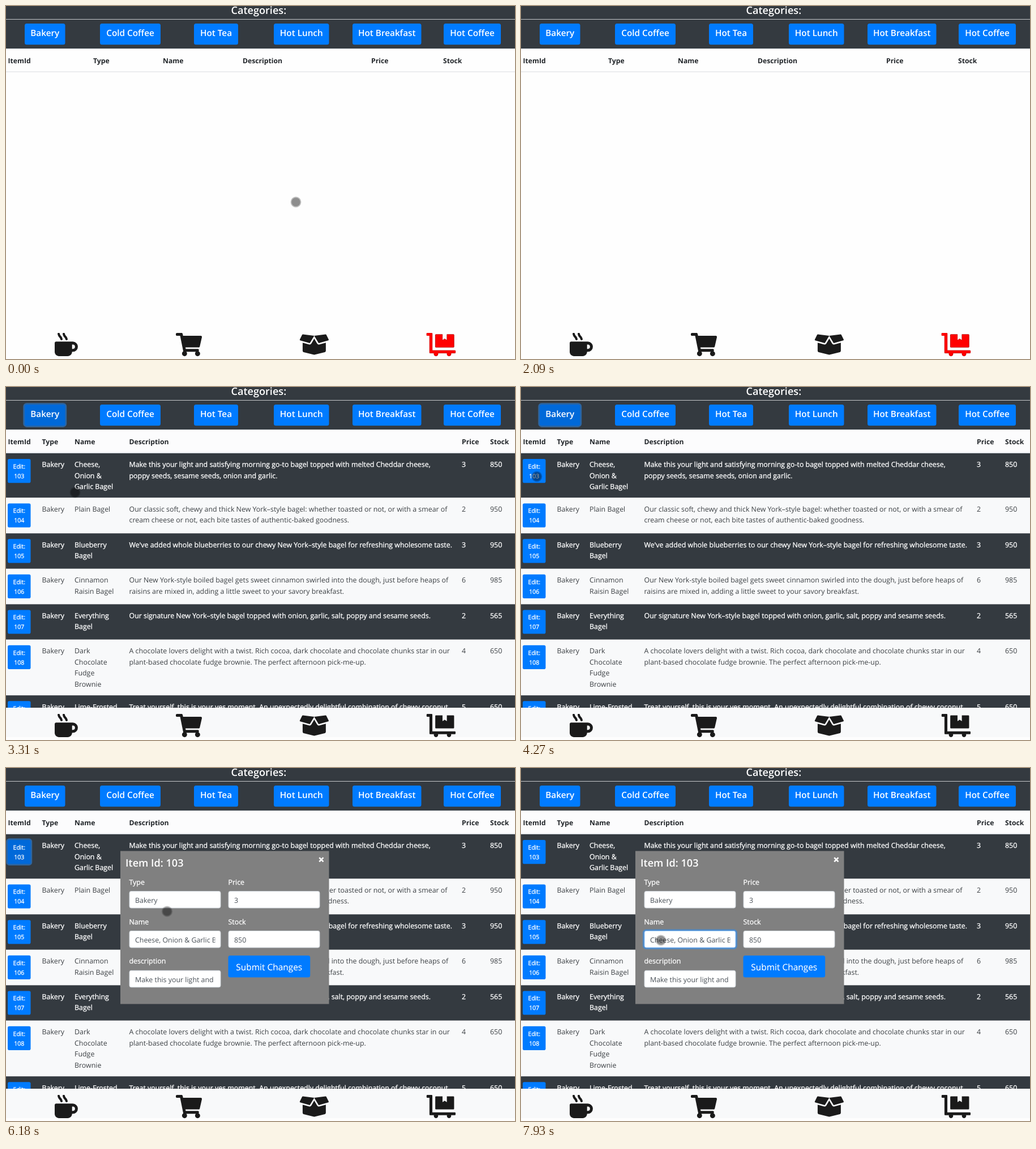
Recreate the animation shown at these times as an HTML page. Size 899 px wide and 623 px high, loop 8000 ms.

```html
<!DOCTYPE html>
<html lang="en">
<head>
<meta charset="utf-8">
<title>Inventory</title>
<style>
html, body { margin: 0; width: 100%; height: 100%; overflow: hidden; background: #fefefe; }
svg { display: block; width: 899px; height: 623px; }
text { font: 12.4px "Open Sans", "Noto Sans", sans-serif; text-rendering: geometricPrecision; fill: #3c4044; white-space: pre; }
.th { font-size: 12.2px; font-weight: 700; fill: #212529; }
.on { fill: #fff; stroke: #fff; stroke-width: .3px; }
.title, .cat { font-weight: 600; fill: #fff; }
.title { font-size: 18.1px; }
.cat { font-size: 15.3px; }
.edit { font-size: 10.6px; }
.submit { font-size: 15.45px; stroke-width: .15px; }
.field { fill: #495057; }
.mid { text-anchor: middle; }
.btn { fill: #007bff; }
.ring { fill: none; stroke: rgba(38,143,255,.5); stroke-width: 0; }

.before, .after, .modal, .bar, .cursor, .pressed, .ring, .focus { animation: 8s step-end infinite; }
.before { animation-name: before; }
.after { animation-name: after; }
.modal { animation-name: modal; }
.bar { animation-name: bar; }
.cursor { animation-name: cursor; }
.cat-on { animation-name: catOn; }
.cat-ring { animation-name: catRing; }
.edit-on { animation-name: editOn; }
.edit-ring { animation-name: editRing; }
.name-ring { animation-name: nameRing; }
.focus { animation-name: focus; }

@keyframes before { 0% { opacity: 1 } 27.625%, 100% { opacity: 0 } }
@keyframes after { 0% { opacity: 0 } 27.625%, 100% { opacity: 1 } }
@keyframes modal { 0% { opacity: 0 } 58%, 100% { opacity: 1 } }
@keyframes bar { 0% { opacity: 0 } 27.625% { opacity: 1 } 32.375% { opacity: .5 } 33.875%, 100% { opacity: 0 } }
@keyframes catOn { 0% { fill: #007bff } 27.625% { fill: #0069d9 } 59.5%, 100% { fill: #007bff } }
@keyframes catRing {
  0% { stroke-width: 0 } 27.625% { stroke-width: 3px } 29.125% { stroke-width: 5.4px }
  58% { stroke-width: 3px } 59.5%, 100% { stroke-width: 0 }
}
@keyframes editOn { 0% { fill: #007bff } 58% { fill: #0069d9 } 89.625%, 100% { fill: #007bff } }
@keyframes editRing {
  0% { stroke-width: 0 } 59.5% { stroke-width: 5.4px } 89.625% { stroke-width: 2.6px } 91.5%, 100% { stroke-width: 0 }
}
@keyframes nameRing { 0% { stroke-width: 0 } 89.625% { stroke-width: 2.6px } 91.5%, 100% { stroke-width: 5.2px } }
@keyframes focus { 0% { stroke: #ced4da } 89.625% { stroke: #a0c6f0 } 91.5%, 100% { stroke: #80bdff } }
@keyframes cursor {
  0% { opacity: 1; transform: translate(512px, 346px) }
  6.25% { opacity: 0 }
  7.75% { opacity: 1; transform: translate(482px, 314px) }
  9.25% { opacity: 0 }
  10.75% { opacity: 1; transform: translate(417.5px, 231.5px) }
  12.625% { opacity: 0 }
  16.125% { opacity: 1; transform: translate(217px, 100.5px) }
  18% { opacity: 0 }
  21.125% { opacity: 1; transform: translate(71px, 49.5px) }
  26.125% { opacity: 0 }
  27.625% { opacity: 1; transform: translate(69px, 48.5px) }
  36.875% { opacity: 0 }
  38.375% { opacity: 1; transform: translate(88px, 104px) }
  39.875% { opacity: 0 }
  41.375% { opacity: 1; transform: translate(122px, 186px) }
  42.875% { opacity: 0 }
  44.375% { opacity: 1; transform: translate(110px, 233px) }
  45.875% { opacity: 0 }
  47.375% { opacity: 1; transform: translate(69.5px, 202.5px) }
  48.875% { opacity: 0 }
  50.375% { opacity: 1; transform: translate(43px, 174px) }
  51.875% { opacity: 0 }
  53.375% { opacity: 1; transform: translate(28px, 158px) }
  64.375% { opacity: 0 }
  65.875% { opacity: 1; transform: translate(33px, 165px) }
  67.375% { opacity: 0 }
  68.875% { opacity: 1; transform: translate(48px, 188.5px) }
  70.75% { opacity: 0 }
  72.25% { opacity: 1; transform: translate(166px, 281px) }
  74.125% { opacity: 0 }
  77.25% { opacity: 1; transform: translate(284.5px, 253px) }
  78.75% { opacity: 0 }
  80.25% { opacity: 1; transform: translate(308px, 285px) }
  81.75% { opacity: 0 }
  83.25% { opacity: 1; transform: translate(315px, 311px) }
  84.75% { opacity: 0 }
  86.25% { opacity: 1; transform: translate(281px, 300px) }
  87.75% { opacity: 0 }
  89.625% { opacity: 1; transform: translate(267.5px, 306px) }
  94.625% { opacity: 0 }
  96.125% { opacity: 1; transform: translate(257px, 305px) }
  97.625% { opacity: 0 }
  99.125%, 100% { opacity: 1; transform: translate(247px, 304px) }
}
</style>
</head>
<body>
<svg id="stage" viewBox="0 0 899 623"></svg>
<script>
const LINE = 19.5;
const box = (x, y, w, h, attrs = '') => `<rect x="${x}" y="${y}" width="${w}" height="${h}" ${attrs}/>`;
const text = (x, y, str, cls = '') =>
  `<text x="${x}" y="${y}" class="${cls}">${str.replace(/&/g, '&amp;')}</text>`;
const lines = (x, y, str, cls) => str.split('|').map((s, i) => text(x, y + i * LINE, s, cls)).join('');
const icon = (x, d, attrs = '') => `<path transform="translate(${x} 577) scale(.08)" d="${d}" ${attrs}/>`;

const heads = ['ItemId', 'Type', 'Name', 'Description', 'Price', 'Stock'];
const wide = [3.5, 154, 277, 418, 645, 772];
const cols = [3.5, 63.5, 121, 217.5, 805, 855];

const cats = [
  ['Bakery', 33, 71.5], ['Cold Coffee', 166, 107], ['Hot Tea', 332, 78],
  ['Hot Lunch', 473, 97.5], ['Hot Breakfast', 612, 121.5], ['Hot Coffee', 773, 101]
];

// top, name, description, price, stock
const items = [
  [117, 'Cheese,|Onion &|Garlic Bagel', 'Make this your light and satisfying morning go-to bagel topped with melted Cheddar cheese,|poppy seeds, sesame seeds, onion and garlic.', 3, 850],
  [195.5, 'Plain Bagel', 'Our classic soft, chewy and thick New York–style bagel: whether toasted or not, or with a smear of|cream cheese or not, each bite tastes of authentic-baked goodness.', 2, 950],
  [258.3, 'Blueberry|Bagel', 'We\'ve added whole blueberries to our chewy New York–style bagel for refreshing wholesome taste.', 3, 950],
  [320.8, 'Cinnamon|Raisin Bagel', 'Our New York-style boiled bagel gets sweet cinnamon swirled into the dough, just before heaps of|raisins are mixed in, adding a little sweet to your savory breakfast.', 6, 985],
  [383.4, 'Everything|Bagel', 'Our signature New York–style bagel topped with onion, garlic, salt, poppy and sesame seeds.', 2, 565],
  [445.8, 'Dark|Chocolate|Fudge|Brownie', 'A chocolate lovers delight with a twist. Rich cocoa, dark chocolate and chocolate chunks star in our|plant-based chocolate fudge brownie. The perfect afternoon pick-me-up.', 4, 650],
  [544.2, 'Lime-Frosted', 'Treat yourself, this is your yes moment. An unexpectedly delightful combination of chewy coconut', 5, 650],
  [623]
];

const headRow = xs => heads.map((h, i) => text(xs[i], 101, h, 'th')).join('');

const category = ([name, x, w], i) =>
  (i ? '' : box(x, 31, w, 37.2, 'rx="3.5" class="ring cat-ring"')) +
  box(x, 31, w, 37.2, `rx="3.5" class="btn${i ? '' : ' pressed cat-on'}"`) +
  text(x + w / 2, 53, name, 'cat mid');

function row([top, name, desc, price, stock], i) {
  const dark = i % 2 === 0, cls = dark ? 'on' : '', y = top + 24.4;
  const edit = `${cols[0] - .5}" y="${top + 10}`;
  return box(0, top, 899, items[i + 1][0] - top, `fill="${dark ? '#343a40' : '#f8f9fa'}"`) +
    (i ? '' : box(edit, top + 10, 40.5, 42, '').replace(/<rect.*/, '') +
      box(3, top + 10, 40.5, 42.2, 'rx="2.8" class="ring edit-ring"')) +
    box(3, top + 10, 40.5, 42.2, `rx="2.8" class="btn${i ? '' : ' pressed edit-on'}"`) +
    text(23.3, top + 26.8, 'Edit:', 'on edit mid') +
    text(23.3, top + 43.8, String(103 + i), 'on edit mid') +
    ['Bakery', name, desc, String(price), String(stock)]
      .map((s, c) => lines(cols[c + 1], y, s, cls)).join('');
}

function field(x, y, label, value, focus) {
  return text(x, y, label, 'on') +
    (focus ? box(x, y + 11.5, 162, 30.5, 'rx="3.5" class="ring name-ring"') : '') +
    box(x + .5, y + 12, 161, 29.5, `rx="3" fill="#fff" stroke="#ced4da" ${focus ? 'class="focus"' : ''}`) +
    `<svg x="${x}" y="${y}" width="152" height="50">${text(10.5, 32.4, value, 'field')}</svg>`;
}

const modal = box(202, 146.5, 368.5, 270, 'fill="#808080"') +
  text(211, 174.4, 'Item Id: 103', 'title') +
  '<path d="M553.3 158.2l7.2 7.2m0-7.2l-7.2 7.2" stroke="#fff" stroke-width="2.6"/>' +
  field(217.5, 205.6, 'Type', 'Bakery') +
  field(392.5, 205.6, 'Price', '3') +
  field(217.5, 275.5, 'Name', 'Cheese, Onion & Garlic Bagel', true) +
  field(392.5, 275.5, 'Stock', '850') +
  field(217.5, 345.4, 'description', 'Make this your light and satisfying') +
  box(392.5, 331, 144.7, 38.5, 'rx="3.5" class="btn"') +
  text(464.8, 356.7, 'Submit Changes', 'on submit mid');

const steam = 'c2 8 8 14 16 14h16c10 0 18-8 16-18-4-28-16-54-36-75-15-15-24-33-27-53-1-8-8-14-16-14h-17c-10 0-17 8-16 18 4 32 18 61 41 84 12 12 20 28 23 44z';
const mug = `M127 146${steam}M239 146${steam}M400 192H32c-18 0-32 14-32 32v192c0 53 43 96 96 96h192c53 0 96-43 96-96h16a112 112 0 000-224zm0 160h-16v-96h16a48 48 0 010 96z`;
const cart = 'M528 301L575 93C579 78 567 64 552 64H159L150 19C148 8 138 0 127 0H24C11 0 0 11 0 24v16c0 13 11 24 24 24h70l70 343a56 56 0 1067 9h210a56 56 0 1063-10l6-25c3-15-8-29-23-29H218l-6-32h293c11 0 21-8 23-19z';
const crate = 'M426 256c-17 0-33-9-42-23L320 126 256 233c-11 18-34 27-55 21L64 215v178c0 15 10 28 24 31l216 54q16 4 31 0l217-54c14-3 24-16 24-31V215l-137 39q-6 2-13 2zM638 144L587 41q-5-10-17-9L320 64l92 152q6 10 18 7l198-56c10-3 15-14 10-23zM53 41L2 144c-5 9 0 20 10 23l198 56q12 3 18-7L320 64 70 32q-12-1-17 9z';
const dolly = 'M208 320h384q16 0 16-16V48q0-16-16-16H448v128l-48-32-48 32V32H208q-16 0-16 16v256q0 16 16 16zM624 384H128V16q0-16-16-16H16Q0 0 0 16v32q0 16 16 16h48v368q0 16 16 16h83a48 48 0 1090 0h198a48 48 0 1090 0h83q16 0 16-16v-32q0-16-16-16z';

document.getElementById('stage').innerHTML =
  box(0, 0, 899, 623, 'fill="#fefefe"') +
  box(0, 0, 899, 75, 'fill="#343a40"') +
  box(0, 23, 899, 1, 'fill="#c4c6c8"') +
  text(446.3, 14, 'Categories:', 'title mid') +
  cats.map(category).join('') +
  box(0, 75, 899, 1, 'fill="#dee2e6"') +
  `<g class="before">${headRow(wide)}${box(0, 115.5, 899, 1.2, 'fill="#dee2e6"')}</g>` +
  `<g class="after">${box(0, 76, 899, 41, 'fill="#fcfcfd"')}${box(0, 115.5, 899, 1.5, 'fill="#dee2e6"')}` +
  headRow(cols) + items.slice(0, -1).map(row).join('') +
  box(0, 566, 899, 57, 'fill="#fefefe"') + box(0, 566, 899, 52, 'fill="#f8f9fa"') + '</g>' +
  box(893, 79, 3, 269, 'rx="1" fill="#8a8c8e" class="bar"') +
  `<g fill="#1a1a1a">${icon(86, mug)}${icon(300, cart)}${icon(518.8, crate)}${icon(742.8, dolly)}</g>` +
  icon(742.8, dolly, 'fill="#f00" class="before"') +
  `<g class="modal">${modal}</g>` +
  '<g class="cursor"><circle r="7.8" opacity=".44"/><circle r="8.6" fill="none" stroke="#000" stroke-width="1.6" opacity=".24"/></g>';
</script>
</body>
</html>
```
